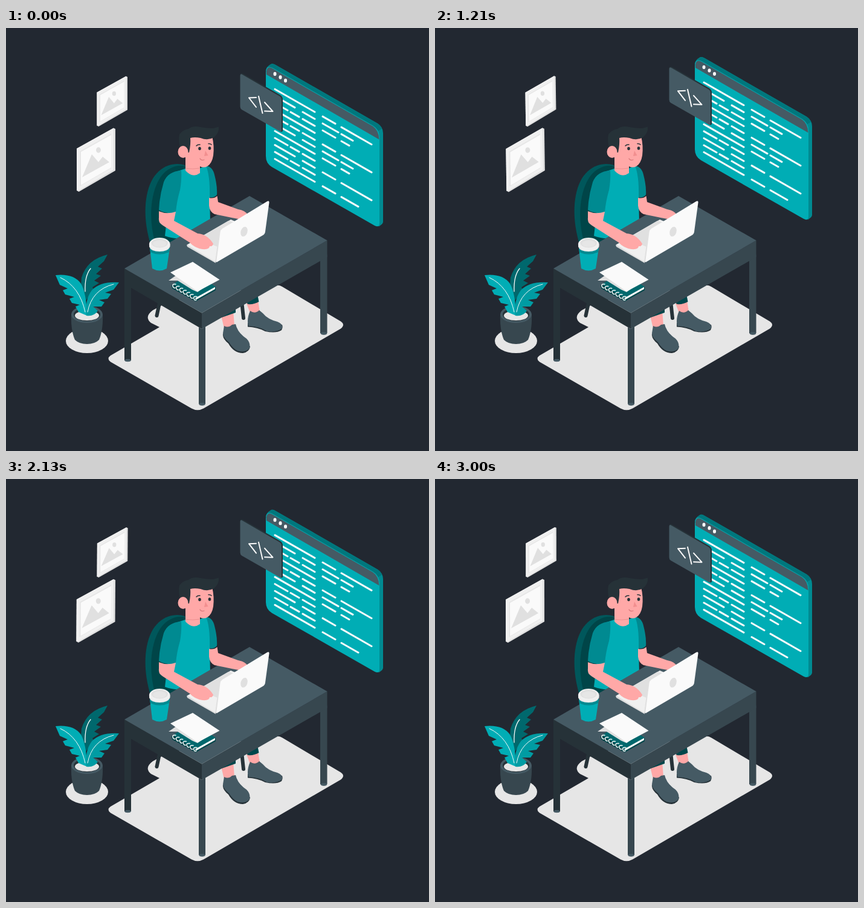
Recreate the animation shown at these times as an HTML page. Size 700 px wide and 700 px high, loop 3.04 s.

```html
<!DOCTYPE html>
<html lang="en">
<head>
<meta charset="utf-8">
<title>Developer at a desk</title>
<style>
html, body { margin: 0; width: 100%; height: 100%; overflow: hidden; background: #222831; }
svg { display: block; width: 100vw; height: 100vh; }
.teal { fill: #00adb5; } .shade { fill: #008a91; } .deep { fill: #00686d; } .cuff { fill: #00474b; }
.ink { fill: #263238; } .slate { fill: #37474f; } .steel { fill: #455a64; }
.white { fill: #fafafa; } .light { fill: #e6e6e6; } .grey { fill: #e0e0e0; }
.skin { fill: #ffa8a7; }
.line { fill: none; stroke: #fafafa; stroke-linecap: round; stroke-linejoin: round; }
</style>
</head>
<body>
<svg viewBox="0 0 700 700">
  <defs>
    <g id="picture">
      <path class="grey" d="M117 199.500L178 165.500L181 167V236L120.500 271L117 269Z"/>
      <path fill="#f0f0f0" d="M117 199.500L178 165.500V234.500L120 269L117 269Z"/>
      <path class="light" d="M122 204L174 175V232L122 262Z"/>
      <path class="white" d="M124 205L174 177V231L124 260Z"/>
      <path class="grey" d="M126 247L142 209L153 222L160 213L171 222Z"/>
      <ellipse class="grey" cx="153" cy="202" rx="4" ry="4.700"/>
    </g>
  </defs>

  <!-- floor -->
  <path class="light" d="M173 542L254 495L240 488Q228 478 243 467L265 455L330 440L440 429Q449 423 457 428L554 485.500Q562 491 554 497.500L327 629.500Q317 635 307 629.500L173 552.500Q166 547 173 542Z"/>

  <g id="pictures">
    <use href="#picture" transform="translate(58 -51) scale(.79)"/>
    <use href="#picture"/>
  </g>

  <!-- plant -->
  <ellipse class="light" cx="134" cy="517.700" rx="35" ry="20.300"/>
  <path class="slate" d="M108 474Q107 500 114 516Q121 523 134 523Q147 523 154 516Q161 500 160 474Z"/>
  <ellipse class="steel" cx="134" cy="474" rx="26" ry="14"/>
  <ellipse class="ink" cx="134" cy="474" rx="22" ry="11"/>
  <ellipse class="light" cx="134" cy="476" rx="20" ry="8"/>
  <path class="deep" d="M168 375Q134 383 125 413Q122 432 131 452L146 434L143 429L154 422L146 418L157 410L149 407L159 398L152 395L162 386Z"/>
  <path class="line" stroke-width="1.300" d="M131 436Q130 410 140 398"/>
  <path class="teal" d="M82 409Q112 406 124 423Q133 438 134 476L120 470L115 461L122 458L109 455L105 448L113 445L98 441L94 434L102 431L89 425Z"/>
  <path fill="#009ca3" d="M187 421Q156 419 142 434Q130 450 133 476Q145 478 152 468L144 461L158 461L163 454L154 450L168 448L174 440L164 438L178 433Z"/>
  <path class="line" stroke-width="1" d="M90 413Q122 428 131 470M178 424Q142 433 135 470"/>

  <!-- window -->
  <g class="float">
    <path class="shade" d="M430 70Q431 64 438 60Q441 58 446 61L615 158Q624 164 624 174V321Q624 324 617 328.500Z"/>
    <path fill="#00777d" d="M431 67L438 60Q441 58 446 61L615 158Q621 162 622 167L615 171Z"/>
    <path class="teal" d="M430 74Q430 60 442 66.500L607 161.500Q618 168 618 181V323Q618 331 610 327L440 230Q430 224 430 212Z"/>
    <path class="steel" d="M431 77V72Q432 61.500 442 67.500L607 162.500Q617 169 617.500 184.500Z"/>
    <g fill="#fff">
      <ellipse cx="445" cy="76" rx="2.500" ry="3.200"/>
      <ellipse cx="454" cy="81.500" rx="2.500" ry="3.200"/>
      <ellipse cx="462.500" cy="87" rx="2.500" ry="3.200"/>
    </g>
    <path id="code" class="line" stroke="#fff" stroke-width="3"/>
    <path class="ink" d="M387.500 78Q388 74 392 75.500L454 111Q458 114 458 118V169Q458 173 453 171Z"/>
    <path class="steel" d="M387.500 79Q387.500 75 391 77L453 113Q456 115 456 118V169Q456 172 453 171L390 135Q387.500 133 387.500 130Z"/>
    <path class="line" stroke-width="2" d="M414 115L402 115.500L414 131M428 123L441.500 138L428 137.500M418 113L424.500 141"/>
  </g>

  <!-- chair and feet -->
  <path fill="none" stroke="#263238" stroke-width="6" stroke-linecap="round" d="M254 455L249.500 476M390 452L393 480"/>
  <path class="skin" d="M356 476L376 466L378 493L361 497ZM398 456L417 450L420 470L405 474Z"/>
  <path class="cuff" d="M352 470L380 460V471L357 479ZM396 450L416 440L418.500 453Q410 458 400 457Z"/>
  <path class="ink" d="M359 506Q358 514 368 522Q377 538 392 538Q403 536 404 527L385 510ZM400 488V494.500Q416 495 429 502Q447 506 456 500Q458.500 496 457 491Z"/>
  <path class="steel" d="M361 493Q368 497 374 491L380 490Q383 504 398 514Q405 521 403 530Q396 538 383 534Q375 530 369 520Q359 512 359 505ZM404 468Q412 474 419 467L425 472Q433 482 449 486Q459 490 457 497Q449 504 432 502Q421 494 401 493Q398 482 404 468Z"/>
  <path fill="#00575b" d="M238 354C227 315 228 275 243 249C256 228 278 221 296 227L306 245L290 370Z"/>
  <path fill="#004548" d="M247 356C235 315 239 270 257 245C268 231 284 225 298 229L306 245L290 370Z"/>

  <!-- torso and head -->
  <path class="shade" d="M330 228Q342 229 345 243Q350 262 349 276Q344 282 334 280Z"/>
  <path class="teal" d="M284 237L299 232H321L331 228Q338 245 337 280L338 322L292 348Q275 349 263 344L268 300L276 260Z"/>
  <path class="shade" d="M290 236Q268 237 261 255Q254 278 253 301Q266 309 281 304Q283 285 288 268Q291 250 290 236Z"/>
  <path class="skin" d="M297 204V236Q309 249 321 240V229Q327 232 333 229Q341 224 343 211Q345 195 341 179H303Z"/>
  <path fill="none" stroke="#e58b8b" stroke-width=".8" d="M298 232.500Q309 234 320 232"/>
  <path class="ink" d="M288 200Q285 185 287 176Q293 168 302 167Q309 161 322 164Q335 166 343 166L352 163.500Q353 174 344 181Q334 187 322 182Q312 180 305 182Q306 192 303 206H297Z"/>
  <ellipse class="skin" cx="293" cy="205" rx="8.500" ry="10"/>
  <path class="skin" d="M297 207H304V217H297Z"/>
  <g class="ink">
    <ellipse cx="320.500" cy="199.500" rx="2.300" ry="2.700"/>
    <ellipse cx="337" cy="199" rx="2.300" ry="2.700"/>
  </g>
  <path fill="none" stroke="#263238" stroke-width="1.500" stroke-linecap="round" d="M315 195Q317 192.500 321 193M335 191.500Q338 191 340 193"/>
  <path fill="#f28f8f" d="M330 203L334.500 211L328 212Z"/>
  <path fill="none" stroke="#d9777a" stroke-width="1.200" stroke-linecap="round" d="M321 216Q323 220 328 218"/>

  <!-- desk -->
  <path class="slate" d="M520 375H531.500V505Q526 510 520 505Z"/>
  <path class="ink" d="M196 398L324 471.500V498L207 430V550Q201 554 196 550Z"/>
  <path class="slate" d="M324 471.500L531.500 351.500V379L324 498Z"/>
  <path class="steel" d="M196 398L403 278L531.500 351.500L324 471.500Z"/>
  <path class="slate" d="M319 495L324 498L330 494V622Q324.500 627 319 622Z"/>
  <ellipse class="steel" cx="201.500" cy="550" rx="5" ry="2.200"/>
  <ellipse class="steel" cx="324.500" cy="622.500" rx="5" ry="2.200"/>
  <ellipse class="steel" cx="526" cy="505.500" rx="5" ry="2.200"/>

  <!-- laptop and arms -->
  <path class="grey" d="M299 359L347 386V389L300 362Z"/>
  <path fill="#f0f0f0" d="M299 359L372 317L427 340L347 387Z"/>
  <path class="grey" d="M320 347L368 319L392 326L354 349L350 362L340 358Z"/>
  <path class="skin" d="M336 281Q344 283 349.500 278L351 288L384 300Q396 302 400 309L390 317L374 314L345 308Q337 304 336 294Z"/>
  <path class="skin" d="M253 303Q266 309 281 304L278 319L317 340Q333 341 343 357Q342 362 337 361Q337 367 325 366Q312 364 304 355L260 327Q252 323 253 314Z"/>
  <path class="grey" d="M346 387L353 335L358 332L350 387Z"/>
  <path class="white" d="M348 388L354.500 338Q355 334 358 332L432 287Q436 285 435.500 289L429 337Q428.500 341 425 343Z"/>
  <ellipse class="grey" cx="394" cy="337" rx="5.500" ry="8.300" transform="rotate(18 394 337)"/>

  <!-- cup -->
  <path class="teal" d="M238 364H271L266 398Q254 405 242 398Z"/>
  <path class="shade" d="M238 364H271L270 371Q254 378 239 371Z"/>
  <path class="light" d="M237 358H271.500V362Q268 370 254 370Q240 370 237 362Z"/>
  <ellipse fill="#f0f0f0" cx="254.200" cy="358" rx="17.300" ry="11"/>
  <ellipse class="grey" cx="254.200" cy="356" rx="13.500" ry="7.500"/>
  <ellipse class="light" cx="254.200" cy="357" rx="11" ry="5.500"/>

  <!-- notebook and paper -->
  <path class="cuff" d="M274 426L308 409L347 429V434L314 452.500L275 431Z"/>
  <path class="white" d="M313 446L346 428V432L314 450Z"/>
  <path class="deep" d="M276 424L308 405L347 428L313 447Z"/>
  <path class="grey" d="M269 418L285 407L330 428L317 437L308 433L284 418Z"/>
  <path class="white" d="M272 404.500L309 387L353.500 416.500L317 436Z"/>
  <path id="rings" class="line" stroke-width="1.500"/>
</svg>
<script>
const LOOP = 3040, SLOPE = 0.572, TOP = 101.2, ROW = 11.55;
const $ = id => document.getElementById(id);

// Horizontal spans of each code row, as start and end x
const full = [445, 511];
const split = [445, 466, 471, 485, 491, 511];
const pair = [445, 478, 491, 511];
const long = [524, 545, 555, 605];
const medium = [524, 550, 555, 574];
const short = [524, 545, 555, 568];
const left = [full, pair, split, full, split, pair, full, split, pair, split, full];
const right = [long, medium, short, [], long, medium, short, [], long, [], [524, 545, 555, 583]];

let code = '';
left.forEach((spans, row) => {
  const all = [...spans, ...right[row]];
  const point = x => `${x} ${TOP + row * ROW + (x - 445) * SLOPE}`;
  for (let i = 0; i < all.length; i += 2) code += `M${point(all[i])}L${point(all[i + 1])}`;
});
$('code').setAttribute('d', code);

let rings = '';
for (let i = 0; i < 7; i++) rings += `M${281 + i * 5.8} ${424 + i * 3.4}q-6 -1 -5 3t4 3`;
$('rings').setAttribute('d', rings);

// Linear wave: 0, 1, 0, -1, 0 over one unit
const wave = p => Math.abs(((p + 0.75) % 1) * 4 - 2) - 1;
const panel = document.querySelector('.float');

function draw(now) {
  const p = (now % LOOP) / LOOP;
  const lift = 14 * (1 - Math.abs(2 * p - 1));
  panel.setAttribute('transform', `translate(0 ${-lift})`);
  $('pictures').setAttribute('transform', `rotate(${wave(p * 2)} 159 175)`);
  requestAnimationFrame(draw);
}
draw(0);
</script>
</body>
</html>
```
